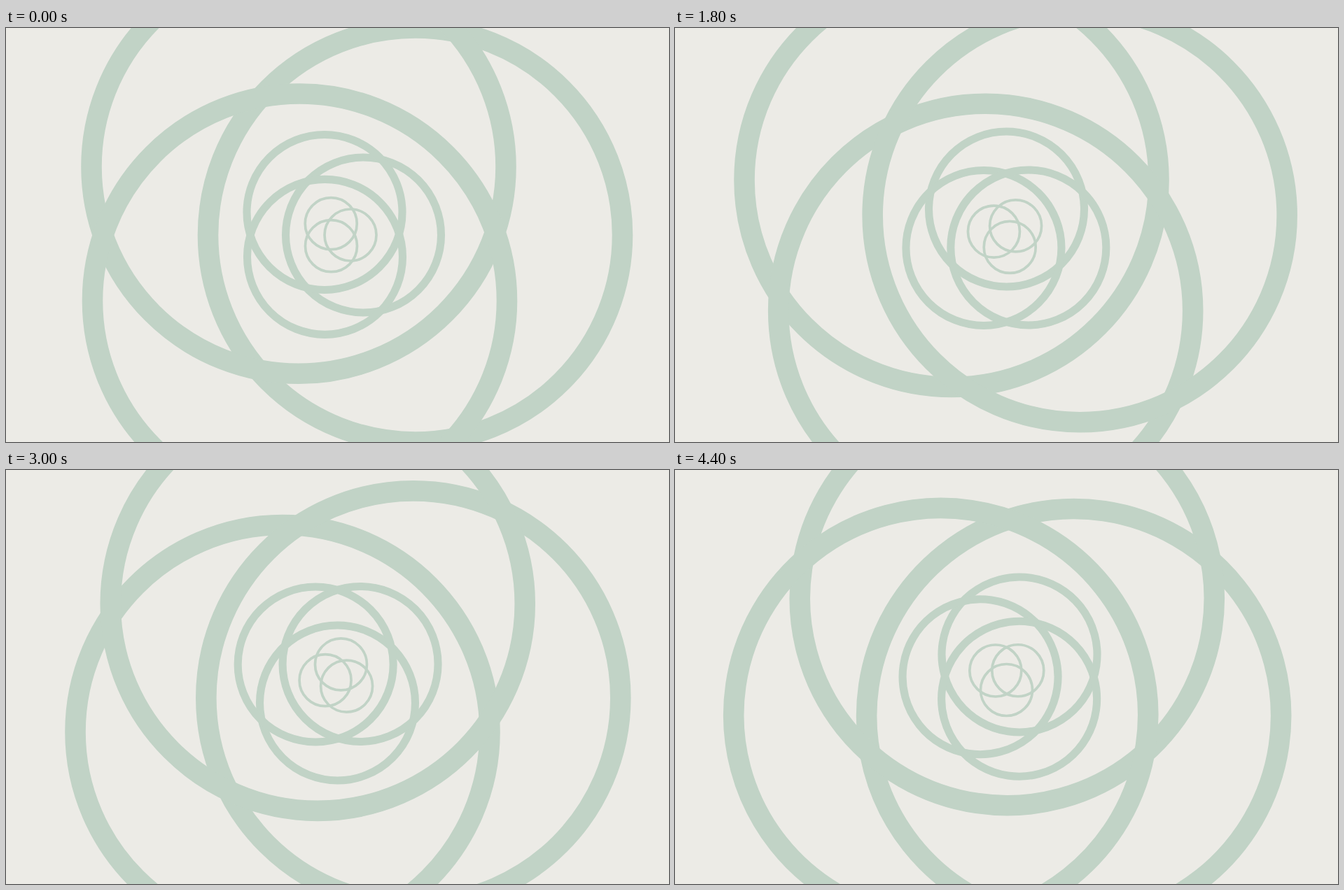
An HTML page that plays this animation: 947x592 px, repeating every 4.6 s.

```html
<!DOCTYPE html>
<html lang="en">
<head>
<meta charset="utf-8">
<title>Turning rings</title>
<style>
  html, body { margin: 0; width: 100%; height: 100%; overflow: hidden; background: #ecebe6; }
  svg { display: block; width: 100%; height: 100%; }
  circle { fill: none; stroke: #c1d3c6; }
</style>
</head>
<body>
<svg viewBox="0 0 947 592"></svg>
<script>
const SVG_NS = "http://www.w3.org/2000/svg";
const STEP_MS = 200;
const STEP_COUNT = 23;
const UNIT = 3.7;

// Centres of the three rings around the pivot; slightly uneven, so each trio wobbles.
const TRIO = [[30, 0], [-15, -26.4], [-14.6, 25.4]];

// Sizes are in units, turn is in degrees per step.
const GROUPS = [
  { radius: 80, stroke: 8, spread: 1, turn: -15 },
  { radius: 30, stroke: 3, spread: 1 / 3, turn: 30 },
  { radius: 10, stroke: 1, spread: 1 / 6, turn: -45 },
];

function addElement(parent, name, attributes = {}) {
  const element = document.createElementNS(SVG_NS, name);
  for (const key in attributes) element.setAttribute(key, attributes[key]);
  return parent.appendChild(element);
}

const svg = document.querySelector("svg");
for (const group of GROUPS) {
  group.node = addElement(svg, "g");
  for (const [x, y] of TRIO) {
    addElement(group.node, "circle", {
      cx: x * group.spread,
      cy: y * group.spread,
      r: group.radius,
      "stroke-width": group.stroke,
    });
  }
}

function draw(time) {
  const step = Math.floor(time / STEP_MS) % STEP_COUNT;
  for (const { node, turn } of GROUPS) {
    node.setAttribute("transform", `translate(473.5 296) scale(${UNIT}) rotate(${turn * step})`);
  }
}

const start = performance.now();
function tick() {
  draw(performance.now() - start);
  requestAnimationFrame(tick);
}
draw(0);
requestAnimationFrame(tick);
</script>
</body>
</html>
```
